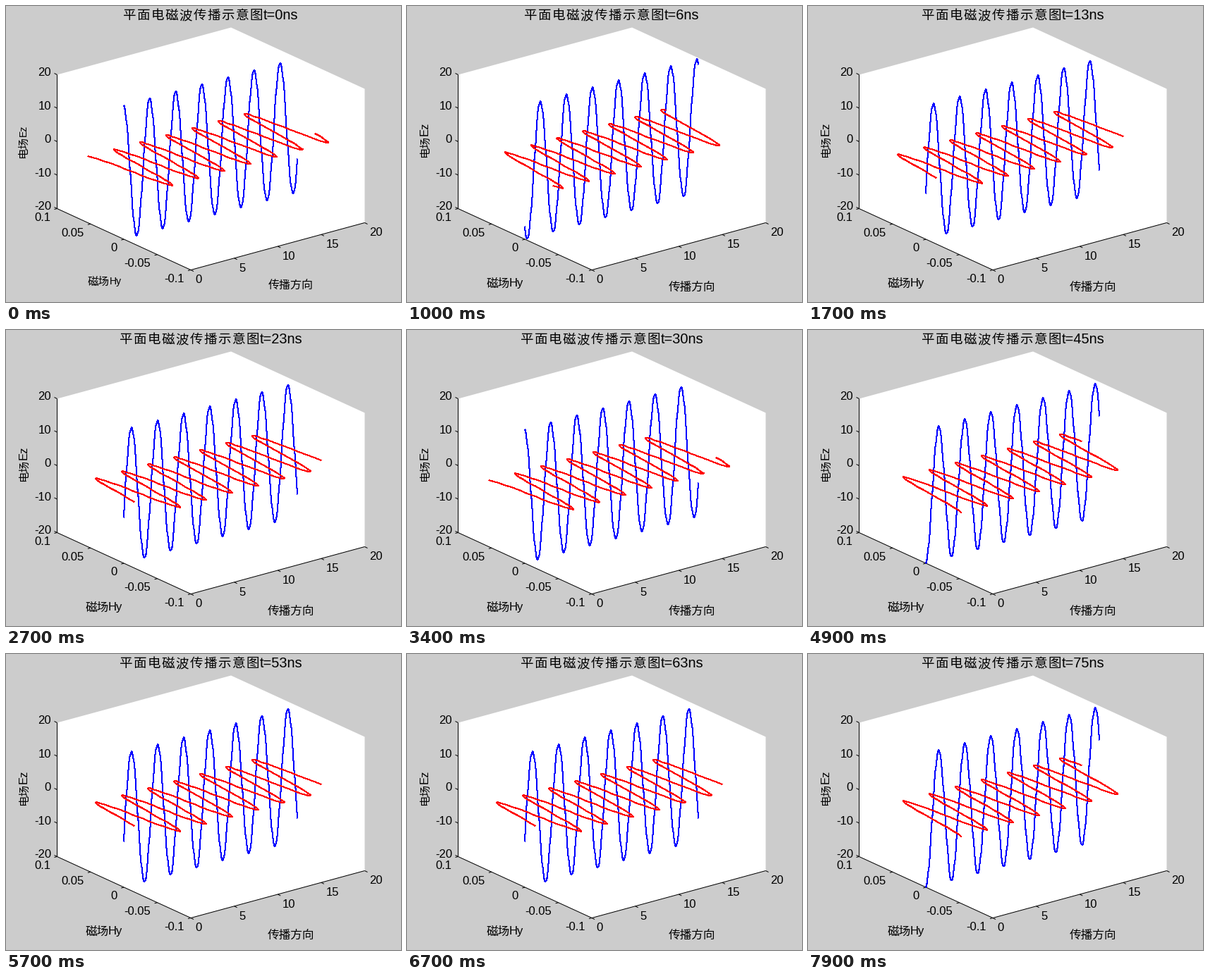
A matplotlib script for the animation above (8 s loop, 560 by 420 pixels).

```python
import numpy as np
import matplotlib.pyplot as plt
from matplotlib.animation import FuncAnimation

W, H, DPI = 560, 420, 120
STEP_MS, FRAMES, HOLD = 100, 80, 5
LATIN, HAN = "Liberation Sans", "Noto Sans CJK JP"

fig = plt.figure(figsize=(W / DPI, H / DPI), dpi=DPI, facecolor="#cccccc")
ax = fig.add_axes([0, 0, 1, 1])
ax.set_xlim(-0.5, W - 0.5)
ax.set_ylim(H - 0.5, -0.5)
ax.axis("off")


def px(n):
    """Pixels to points."""
    return n * 72 / DPI


def project(x, y, z):
    """Orthographic view of the field box, in stage pixels."""
    u, v, w = x / 20, (y + 0.1) / 0.2, (z + 20) / 40
    return 261.5 + 246.5 * u - 189.5 * v, 374 - 67 * u - 87 * v - 190 * w


def edge(pts):
    ax.plot(*zip(*pts), color="black", lw=px(1), solid_capstyle="butt")


def wave(color):
    # Hard-edged strokes fill every pixel they touch, so 1 px shows as 2
    return ax.plot([], [], color=color, lw=px(1), antialiased=False,
                   solid_joinstyle="round", solid_capstyle="butt")[0]


def write(x, y, s, size, font=LATIN, ha="left", rot=0):
    return ax.text(x, y, s, fontsize=px(size), family=font, ha=ha,
                   va="baseline", rotation=rot, rotation_mode="anchor")


def tick(p, dx, dy):
    edge([p, (p[0] + dx, p[1] + dy)])


# White walls and floor, then the three visible axes
corners = [(0, .1, -20), (0, .1, 20), (20, .1, 20),
           (20, -.1, 20), (20, -.1, -20), (0, -.1, -20)]
box = [project(*c) for c in corners]
ax.fill(*zip(*box), color="white", lw=0)
edge([box[1], box[0], box[5], box[4]])

TICK_PX = 16.67
for z in range(-20, 21, 10):
    p = project(0, .1, z)
    tick(p, -4, -2)
    write(p[0] - 8.5, p[1] + 2, str(z), TICK_PX, ha="right")
for y in (.1, .05, 0, -.05, -.1):
    p = project(0, y, -20)
    tick(p, -4, 1)
    write(p[0] - 9.5, p[1] + 17.5, f"{y:g}", TICK_PX, ha="right")
for x in range(0, 21, 5):
    p = project(x, -.1, -20)
    tick(p, 4, 2)
    write(p[0] + 6.5, p[1] + 19, str(x), TICK_PX)

# Axis names: a slightly smaller set shows before the wave starts moving
first = [
    write(115, 395, "磁场", 15.5, HAN), write(146, 395, "Hy", 14),
    write(371, 400, "传播方向", 16, HAN),
    write(28, 216, "电场", 15.5, HAN, rot=90), write(28, 185, "Ez", 14, rot=90),
]
later = [
    write(112, 398, "磁场", 16.67, HAN), write(144, 398, "Hy", TICK_PX),
    write(370, 403, "传播方向", 16.67, HAN),
    write(29, 215, "电场", 15.5, HAN, rot=90),
    write(29, 184, "Ez", TICK_PX, rot=90),
]

PITCH = 19.9
title = [write(0, 18.5, ch, 18.5, HAN) for ch in "平面电磁波传播示意图"]
clock = write(364, 19, "", 20)

xs = np.linspace(0, 20, 201)
e_line = wave("#0000ff")
h_line = wave("#ff0000")


def place(line, x, y):
    line.set_data(np.round(x) - 0.5, np.round(y) + 0.5)


def draw(i):
    t = max(0, i - HOLD + 1)
    e = 20 * np.cos(2 * np.pi * (t / 10 - xs / 3))
    place(e_line, *project(xs, 0, e))
    place(h_line, *project(xs, e / 377, 0))
    left = 165 if t < 10 else 160
    for k, ch in enumerate(title):
        ch.set_x(left + 0.5 + k * PITCH)
    clock.set_x(left + 199)
    clock.set_text(f"t={t}ns")
    for label in first:
        label.set_visible(t == 0)
    for label in later:
        label.set_visible(t > 0)
    return e_line, h_line, clock, *title, *first, *later


anim = FuncAnimation(fig, draw, frames=FRAMES, interval=STEP_MS,
                     repeat=True, repeat_delay=0)
plt.show()
```
